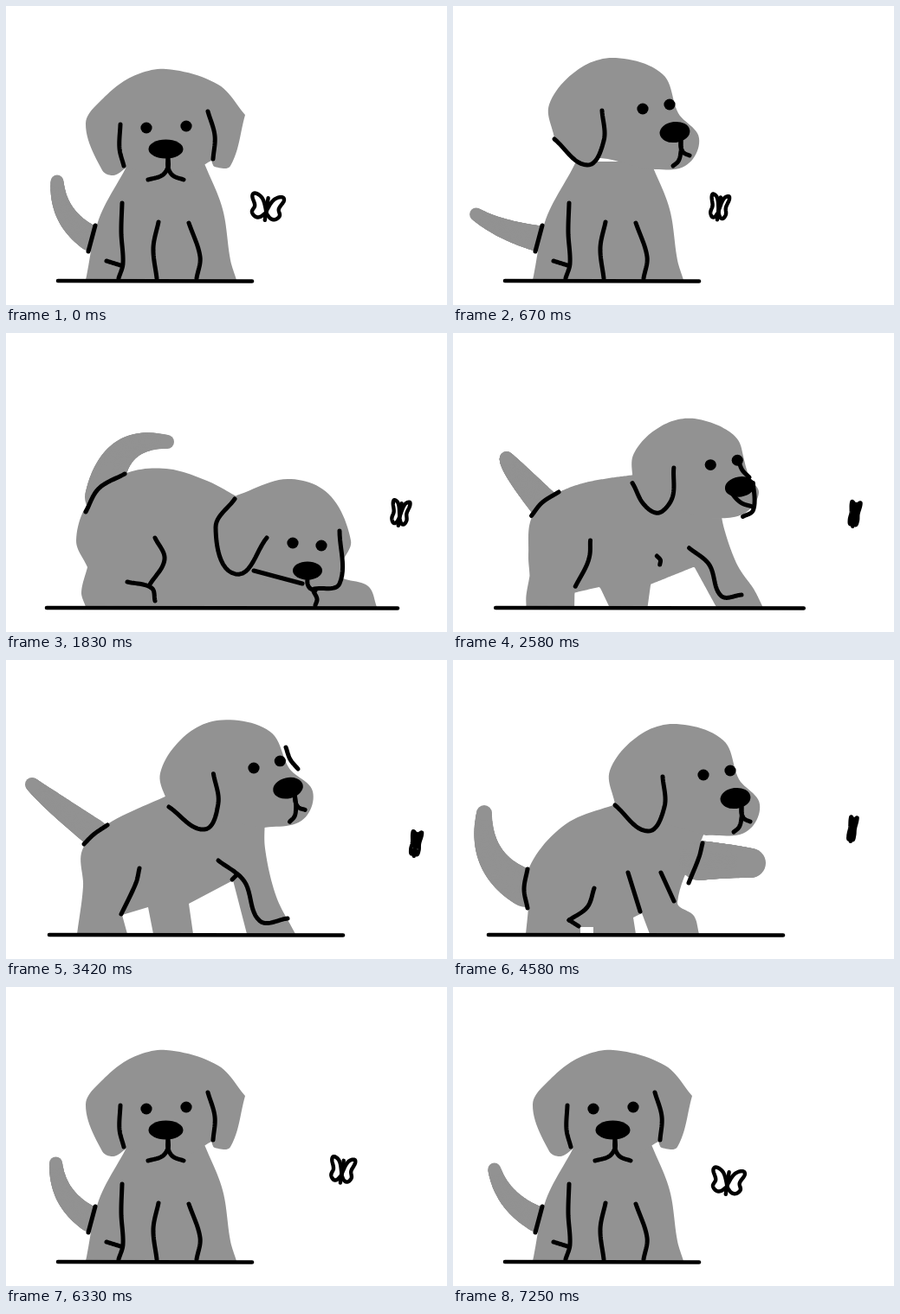
An HTML page with a canvas for the animation above (7.33 s loop, 509 by 346 pixels).

```html
<!DOCTYPE html>
<html lang="en">
<head>
<meta charset="utf-8">
<title>Puppy and butterfly</title>
<style>
html, body { margin: 0; width: 100%; height: 100%; overflow: hidden; background: #fff; }
canvas { display: block; width: 509px; height: 346px; }
</style>
</head>
<body>
<canvas id="stage" width="509" height="346"></canvas>
<script>
const ctx = document.getElementById('stage').getContext('2d');
const LOOP = 7330, STEPS = 88, GRAY = '#929292', INK = '#000';

// "x,y" points; a trailing "!" makes a sharp corner
const P = s => s.split(' ').flatMap(w => {
  const p = w.replace('!', '').split(',').map(Number);
  return w.endsWith('!') ? [p, p] : [p];
});
const L = (...list) => list.map(P);
const mix = (a, b, u) => a + (b - a) * u;
const mixPts = (a, b, u) => a.map((p, i) => p.map((v, q) => mix(v, b[i][q], u)));
const dist = (a, b) => Math.hypot(b[0] - a[0], b[1] - a[1]);
const turn = ([x, y], [cx, cy], r) => {
  const c = Math.cos(r), s = Math.sin(r);
  return [cx + (x - cx) * c - (y - cy) * s, cy + (x - cx) * s + (y - cy) * c];
};

// ---- parts ----
// Tapered limb along a quadratic curve: root, bend, tip
const limb = (s, ...radii) => ({ pts: P(s), radii });
// Two lips hanging from one point, each given by its end offset
const lips = (x, y, ...ends) => ends.map(([dx, dy]) =>
  [[0, 0], [0, .42], [.3, .8], [1, 1]].map(([a, b]) => [x + a * dx, y + b * dy]));
// Bent hind leg with its foot
const haunch = (x, y) => L('0,0 11,25 -6,54', '-32,51 -4,58 0,73')
  .map(line => line.map(p => [x + p[0], y + p[1]]));

function warp(head, f) {
  const [skin, eyes, nose] = [head.skin, head.eyes, head.nose].map(pts => pts.map(f));
  return { ...head, skin, eyes, nose, lines: head.lines.map(l => l.map(f)) };
}
const move = (head, dx, dy, r = 0) => ({
  ...warp(head, p => turn(p, head.eyes[0], r).map((v, q) => v + (q ? dy : dx))),
  tilt: head.tilt + r
});
function mirror(head) {
  const m = warp(head, ([x, y]) => [370 - x, y]);
  m.skin.reverse();
  m.eyes.reverse();
  return m;
}

// ---- heads ----
const front = {
  skin: P('139,187! 124,196 111,190 92,136 112,107 145,82 185,73 245,91 276,126! 259,185 241,186 237,179! 195,200'),
  lines: [...L('132,137 131,165 136,185', '233,122 241,150 239,177'), ...lips(187, 176, [-23, 25], [18, 25])],
  eyes: P('162,141 208,139'), nose: P('184.5,165.5'), size: [20, 11], tilt: 0
};
const shaken = {
  ...front, flap: true,
  skin: P('139,188! 124,140 128,108! 104,121 84,146 66,146 67,105 118,63 165,74! 215,77 258,106 258,148 231,187! 190,200'),
  lines: [...L('215,124 201,165 242,165', '215,124 216,126'), ...lips(185, 176, [-19, 25], [18, 25])]
};
const ducked = {
  skin: P('222,130! 207,115 223,84 268,75 321,93! 354,95 379,140 371,200 365,228 320,238 260,190'),
  lines: [...L('222,128 265,130 278,144', '326,239 347,238 364,227'), ...lips(339, 220, [-25, 13], [11, 15])],
  eyes: P('316,174 356,181'), nose: P('341,211'), size: [18.5, 13], tilt: .15
};
const lowered = {
  skin: P('266,188! 325,169 372,186 398,240 388,265! 380,293 345,290 268,279 243,230'),
  lines: [...L('264,192 242,225 265,279 301,237', '385,229 385,290 356,296', '286,275 342,290'), lips(348, 284, [9, 14])[0]],
  eyes: P('331,243 364,246'), nose: P('348,275'), size: [17, 10.5], tilt: 0
};
const profile = {
  skin: P('187,167! 181,128 215,87 258,74 312,93 330,138 354,167 338,199 292,203! 240,190 224,198'),
  lines: [P('187,168 225,198 244,170 242,135'), ...lips(333, 170, [-9, 29], [10, 17])],
  eyes: P('289,133 320,128'), nose: P('326,160'), size: [17.5, 12], tilt: -.12
};
const raised = move(profile, -3, -8, -.1);
raised.lines.push(P('323,101 328,115 337,126'));

// ---- poses; a body is its back, its feet and its front ----
const sit = {
  head: front, ground: [60, 284],
  tail: limb('98,269 60,246 59,203', 15, 7.5), base: P('103,254 95,284'),
  body: L('142,180 138,188 107,247 92,317', '92,317 266,317', '266,317 259,294 250,235 228,180'),
  lines: L('134,228 133,262 135,298 130,315', '116,295 132,300', '176,250 170,280 174,315', '211,251 224,290 220,315'),
  wag: -.4, phase: 3.93, at: 0
};
const look = { ...sit, head: move(profile, -70, -14) };
const shake = { ...sit, head: shaken, tail: null, base: null };
const shakeBack = { ...shake, head: mirror(shaken) };
const pounce = {
  head: ducked, ground: [52, 370],
  tail: limb('106,245 100,215 109,202', 16, 18), base: P('121,185 99,225 92,272'),
  body: L('222,129 172,146 122,185 97,235 92,298 104,317', '104,317 243,317',
    '243,317 242,303 224,287! 236,258 262,247! 280,262 309,252 305,225'),
  paw: limb('335,238 350,244 371,247', 12, 17),
  lines: [...haunch(168, 243), ...L('218,212 238,217 260,244', '236,183 270,195 306,236', '168,307 198,304 223,288')],
  wag: 0, at: 14
};
const bow = {
  head: lowered, ground: [47, 452],
  tail: limb('113,190 122,118 186,126', 22, 8), base: P('137,163 107,180 92,207'),
  body: L('266,189 232,171 185,157 137,163 96,195 81,240 94,271! 87,300 92,317', '92,317 428,317',
    '428,317 418,293 384,281 330,220'),
  lines: [...haunch(172, 237), P('355,299 359,308 357,315')],
  wag: .12, at: 22, bob: 1.5
};
const walk = {
  head: raised, ground: [50, 389],
  tail: limb('103,201 50,162 30,144', 16, 8), base: P('117,191 101,202 90,213'),
  body: L('188,156 117,190 88,220 89,262 82,317',
    '82,317 140,317 134,295 164,286 170,317 216,317 211,282 262,255 278,317 334,317',
    '334,317 312,274 299,218 299,180'),
  lines: L('154,241 150,258 133,294', '267,248 261,254', '245,232 275,256 293,302 325,299'),
  wag: -.16, at: 41, bob: 3
};
const reach = {
  head: profile, ground: [41, 381],
  tail: limb('84,264 30,238 36,177', 22, 9), base: P('86,242 82,265 86,287'),
  body: L('190,166 130,190 88,240 87,285 84,317',
    '84,317 147,317 147,309 162,309 162,317 211,317 208,298 218,293 227,317 284,317',
    '284,317 278,296 259,280 290,200'),
  paw: limb('284,232 312,232 344,235', 23, 17),
  lines: L('163,264 155,286 134,301', '134,301 145,308', '202,246 216,291', '240,246 255,279', '288,212 284,228 272,258'),
  wag: -.14, at: 55
};

const timeline = [[0, sit], [6, sit], [8, look], [10, look], [14, pounce], [18, bow], [28, bow], [32, walk],
  [46, walk], [53, reach], [58, reach], [62, look], [63, look], [65, shake], [66, shake], [68, shakeBack],
  [70, shake], [72, sit], [STEPS, sit]];
const flight = [[0, 301, 233], [9, 308, 228], [14, 437, 216], [22, 455, 208], [41, 473, 212], [55, 461, 195],
  [66, 482, 201], [72, 414, 215], [87, 317, 225], [STEPS, 301, 233]];

// ---- curves ----
function curve(pts, closed) {
  const n = pts.length, out = [];
  const at = i => closed ? pts[(i + n) % n] : pts[Math.max(0, Math.min(n - 1, i))];
  for (let i = 0; i < (closed ? n : n - 1); i++) {
    const [a, b, c, d] = [-1, 0, 1, 2].map(o => at(i + o)), len = dist(b, c);
    if (!len) continue;
    const k1 = len / (dist(a, c) || 1), k2 = len / (dist(b, d) || 1);
    for (let j = 0; j < 12; j++) {
      const t = j / 12, s = 1 - t;
      out.push([0, 1].map(q => b[q] * s * s * (1 + 2 * t) + c[q] * t * t * (3 - 2 * t)
        + (c[q] - a[q]) * k1 * t * s * s - (d[q] - b[q]) * k2 * t * t * s));
    }
  }
  out.push(closed ? out[0] : pts[n - 1]);
  return out;
}
function resample(pts, n = 160) {
  const sum = [0];
  for (let i = 1; i < pts.length; i++) sum.push(sum[i - 1] + dist(pts[i - 1], pts[i]));
  const out = [], total = sum[sum.length - 1];
  for (let i = 0, j = 0; i < n; i++) {
    const s = total * i / (n - 1);
    while (j < pts.length - 2 && sum[j + 1] < s) j++;
    const u = Math.min(1, (s - sum[j]) / (sum[j + 1] - sum[j] || 1));
    out.push(mixPts([pts[j]], [pts[j + 1]], u)[0]);
  }
  return out;
}
function morph(a, b, u, shape = curve) {
  if (!u || !a || !b) {
    const pts = u < .5 ? a : b;
    return pts && shape(pts);
  }
  return mixPts(resample(shape(a)), resample(shape(b)), u);
}
const loop = pts => curve(pts, true);
const straight = pts => pts;

// ---- drawing ----
function trace(pts) {
  ctx.beginPath();
  pts.forEach(p => ctx.lineTo(p[0], p[1]));
}
function fill(pts, color = GRAY) {
  trace(pts);
  ctx.fillStyle = color;
  ctx.fill();
}
function stroke(pts, width = 5) {
  if (!pts) return;
  trace(pts);
  ctx.lineWidth = width;
  ctx.stroke();
}
function oval(x, y, rx, ry, tilt = 0, color = INK) {
  ctx.beginPath();
  ctx.ellipse(x, y, rx, ry, tilt, 0, 7);
  ctx.fillStyle = color;
  ctx.fill();
}
function drawLimb(a, b, u) {
  const near = u < .5 ? a : b;
  if (!near) return;
  const both = a && b;
  const [p, c, q] = both ? mixPts(a.pts, b.pts, u) : near.pts;
  const [radii] = both ? mixPts([a.radii], [b.radii], u) : [near.radii];
  for (let t = 0; t <= 1; t += 1 / 64) {
    const [x, y] = p.map((v, i) => mix(mix(v, c[i], t), mix(c[i], q[i], t), t));
    const r = mix(...radii, t);
    oval(x, y, r, r, 0, GRAY);
  }
}

// Pose with its tail wagged and head bobbed for step k
function animate(pose, k) {
  const { at, wag, phase = 0, bob = 0, tail } = pose;
  const age = k - at - (at || k < 44 ? 0 : STEPS);
  const swing = wag * (Math.sin(phase + .53 * age) - Math.sin(phase));
  return {
    ...pose,
    head: move(pose.head, 0, bob * Math.sin(age * .8)),
    tail: tail && { ...tail, pts: tail.pts.map((p, i) => turn(p, tail.pts[0], swing * i / 2)) }
  };
}

function drawDog(a, b, u) {
  const h = a.head, g = b.head;
  const lines = (p, q) => {
    for (let i = 0; i < Math.max(p.length, q.length); i++) stroke(morph(p[i], q[i], u));
  };
  drawLimb(a.tail, b.tail, u);
  fill(a.body.flatMap((part, i) => morph(part, b.body[i], u, i === 1 ? straight : curve)));
  drawLimb(a.paw, b.paw, u);
  fill(morph(h.skin, g.skin, u, loop));
  stroke(morph(a.base, b.base, u));
  lines(a.lines, b.lines);
  for (const [x, y] of mixPts(h.eyes, g.eyes, u)) oval(x, y, 6.6, 6.4);
  const [[x, y], size] = mixPts([h.nose[0], h.size], [g.nose[0], g.size], u);
  oval(x, y, ...size, mix(h.tilt, g.tilt, u));
  const near = u < .5 ? h : g;
  if (near.flap) fill(curve(near.lines[0]));
  lines(h.lines, g.lines);
  const [[left, right]] = mixPts([a.ground], [b.ground], u);
  stroke([[left, 318], [right, 318.5]], 4.6);
}

const wing = P('1,2 8,-11 18,-13 14,0 16,8 9,13 1,7');
function drawButterfly(k, x, y) {
  const far = k > 30 && k < 70;
  const open = (.75 + .25 * Math.cos(k * 1.88)) * (far ? .4 : 1);
  ctx.save();
  ctx.translate(x, y);
  ctx.rotate(.15);
  for (const side of [-1, 1]) {
    const pts = loop(wing.map(p => [p[0] * side * open, p[1]]));
    fill(pts, '#fff');
    stroke(pts, 4.4);
  }
  stroke([[0, -11], [0, 15]], 4.4);
  ctx.restore();
}

function span(keys, k) {
  const i = keys.findIndex((key, j) => k < keys[j + 1][0]);
  const [a, b] = [keys[i], keys[i + 1]];
  return [a, b, (k - a[0]) / (b[0] - a[0])];
}

function draw(k) {
  ctx.fillStyle = '#fff';
  ctx.fillRect(0, 0, 509, 346);
  ctx.strokeStyle = INK;
  ctx.lineCap = ctx.lineJoin = 'round';
  const [a, b, u] = span(timeline, k);
  drawDog(animate(a[1], k), animate(b[1], k), a[1] === b[1] ? 0 : u);
  const [p, q, v] = span(flight, k);
  drawButterfly(k, mix(p[1], q[1], v), mix(p[2], q[2], v) - 6 * Math.sin(2 * Math.PI * v));
}

const start = performance.now();
let shown = -1;
function tick() {
  const t = (performance.now() - start) % LOOP;
  const k = Math.min(STEPS - 1, Math.floor(t / LOOP * STEPS + .1));
  if (k !== shown) draw(shown = k);
  requestAnimationFrame(tick);
}
tick();
</script>
</body>
</html>
```
